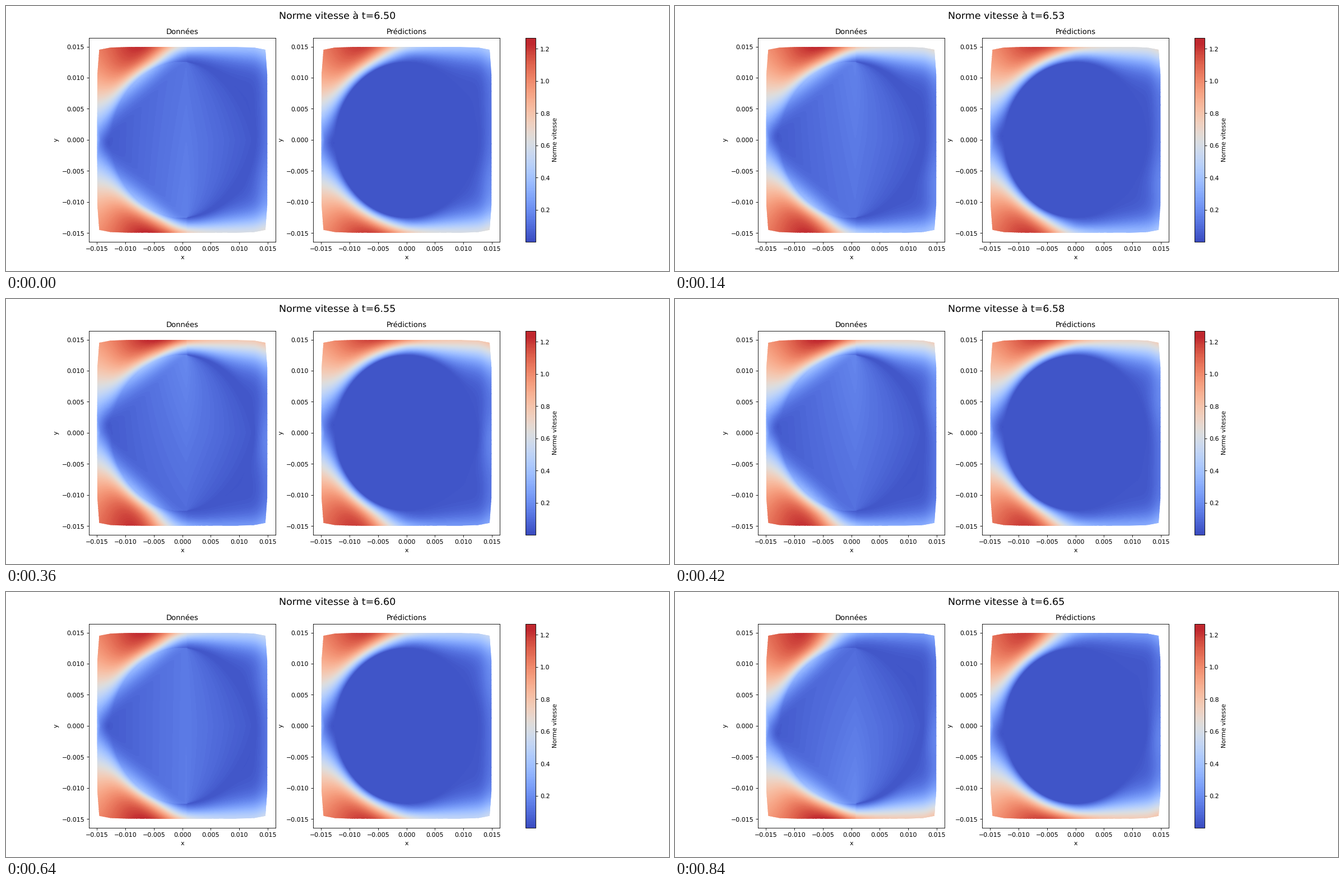
A matplotlib script for the animation above (980 ms loop, 1183 by 473 pixels).

```python
import numpy as np
import matplotlib.pyplot as plt
from matplotlib.animation import FuncAnimation
from matplotlib.cm import ScalarMappable
from matplotlib.colors import BoundaryNorm, ListedColormap
from matplotlib.path import Path

plt.rcParams["text.hinting"] = "none"

W, H = 1183, 473
DPI = W / 15
FRAMES, STEP = 7, 140
R = 12.55            # cylinder radius, mm
LIM = 0.01642

levels = np.linspace(0.0017, 1.2685, 151)
cmap = ListedColormap(plt.get_cmap("coolwarm")(
    np.minimum(np.linspace(0, 1, 256), 0.968)))
norm = BoundaryNorm(levels, 256)

axis = np.linspace(-15.1, 15.1, 321)
X, Y = np.meshgrid(axis, axis)
AY = np.abs(Y)
SIDE = np.tanh(Y / 2)   # +1 along the top wall, -1 along the bottom wall
RAD = np.hypot(X, Y)
D = RAD - R
OUT = np.maximum(D, 0)

# Distance beyond the chords joining the front of the cylinder to its top and bottom
CHORD = (-12.5 * (X + 12.5) + 13.2 * AY) / 18.18


def sigmoid(v):
    return 1 / (1 + np.exp(-v))


def phase(k):
    a = 2 * np.pi * (k - 2.2) / FRAMES
    return np.cos(a), np.sin(a)


def upstream(p):
    """Potential flow speed around the cylinder, tilted by the shedding."""
    a = 0.1 * p
    xr = X * np.cos(a) - Y * np.sin(a)
    yr = X * np.sin(a) + Y * np.cos(a)
    q = (R / np.maximum(RAD, R)) ** 2
    r = np.maximum(RAD, 1e-6)
    return 0.95 * np.hypot(yr / r * (1 + q), xr / r * (1 - q))


def wake(p, q):
    """Shear layers along both walls plus the slow flow behind the cylinder."""
    edge = 0.46 + 0.27 * p * SIDE
    width = (1.4 + 0.15 * np.maximum(X, 0)) * (0.5 + 0.7 * edge)
    gap = np.maximum(15 - AY, 0)
    band = edge * np.exp(-(gap / width) ** 1.5)
    rim = 0.08 * np.exp(-((15 - X) / 1.5) ** 2)
    blob = 0.06 * np.exp(-((X - 14.5) / 2.5) ** 2 - ((Y - 8 * q) / 4.5) ** 2)
    return 0.035 + (band + rim + blob) * np.tanh(OUT)


def diamond(p):
    """Linear interpolation across the empty cylinder."""
    ridge = 0.145 + 0.045 * p * Y / 12.5
    arc = np.sqrt(np.maximum(12.5 ** 2 - Y ** 2, 0))
    back = np.maximum(0.75 * arc + 0.25 * (12.5 - AY) - 0.7, 0.3)
    left = 0.05 + (ridge - 0.05) * np.clip((X + 12.5) / 13.2, 0, 1)
    right = 0.04 + (ridge - 0.04) * np.clip(1 - (X - 0.7) / back, 0, 1)
    return np.where(X < 0.7, left, right)


def speed(k, data):
    p, q = phase(k)
    mix = sigmoid((X + 2 - 1.8 * p * SIDE) / 2)
    layer = OUT
    if data:
        c = np.clip(CHORD, 0, 3.7)
        t = c / (c + np.maximum(-D, 0) + 1e-9)
        layer = OUT + 0.15 * c * t * (X < 0.7)
        inner = diamond(p)
    else:
        inner = np.full_like(X, 0.03)
    front = upstream(p) * np.tanh(layer / 2.6) * (1 - mix)
    fade = inner * np.exp(-OUT / 0.8) * (1 - mix)
    v = np.where(D > 0, front + wake(p, q) * mix + fade, inner + front)
    v = v + 0.12 * np.clip(1 - (X + 15) / 0.6 - AY / 3.4, 0, 1)
    return np.clip(v, 0.003, 1.268)


def outline():
    quarter = np.array([(14.95, 3.4), (14.93, 10.5), (14.6, 14.5),
                        (12.6, 14.85), (9.5, 14.95)])
    top = np.vstack([quarter, quarter[::-1] * (-1, 1)])
    pts = np.vstack([top, top[::-1] * (1, -1)]) / 1000
    return Path(np.vstack([pts, pts[:1]]))


fig, axes = plt.subplots(1, 2, figsize=((W + 1e-6) / DPI, (H + 1e-6) / DPI),
                         dpi=DPI)
title = fig.suptitle("", fontsize=16)
ticks = np.arange(-3, 4) * 0.005
for ax, name in zip(axes, ("Données", "Prédictions")):
    ax.set(title=name, xlabel="x", ylabel="y", xticks=ticks, yticks=ticks,
           xlim=(-LIM, LIM), ylim=(-LIM, LIM))
    ax.autoscale(False)

bar = fig.colorbar(ScalarMappable(norm, cmap), ax=axes, spacing="proportional",
                   ticks=np.arange(1, 7) * 0.2, format="%.1f",
                   label="Norme vitesse")
bar.minorticks_off()

shape = outline()
drawn = []


def update(k):
    while drawn:
        drawn.pop().remove()
    for ax, data in zip(axes, (True, False)):
        cs = ax.contourf(X / 1000, Y / 1000, speed(k, data), levels=levels,
                         cmap=cmap, norm=norm)
        cs.set_clip_path(shape, ax.transData)
        drawn.append(cs)
    title.set_text(f"Norme vitesse à t={6.5 + 0.025 * k + 1e-6:.2f}")
    return drawn


anim = FuncAnimation(fig, update, frames=FRAMES, interval=STEP,
                     init_func=lambda: [], repeat=True, repeat_delay=0)
plt.show()
```
